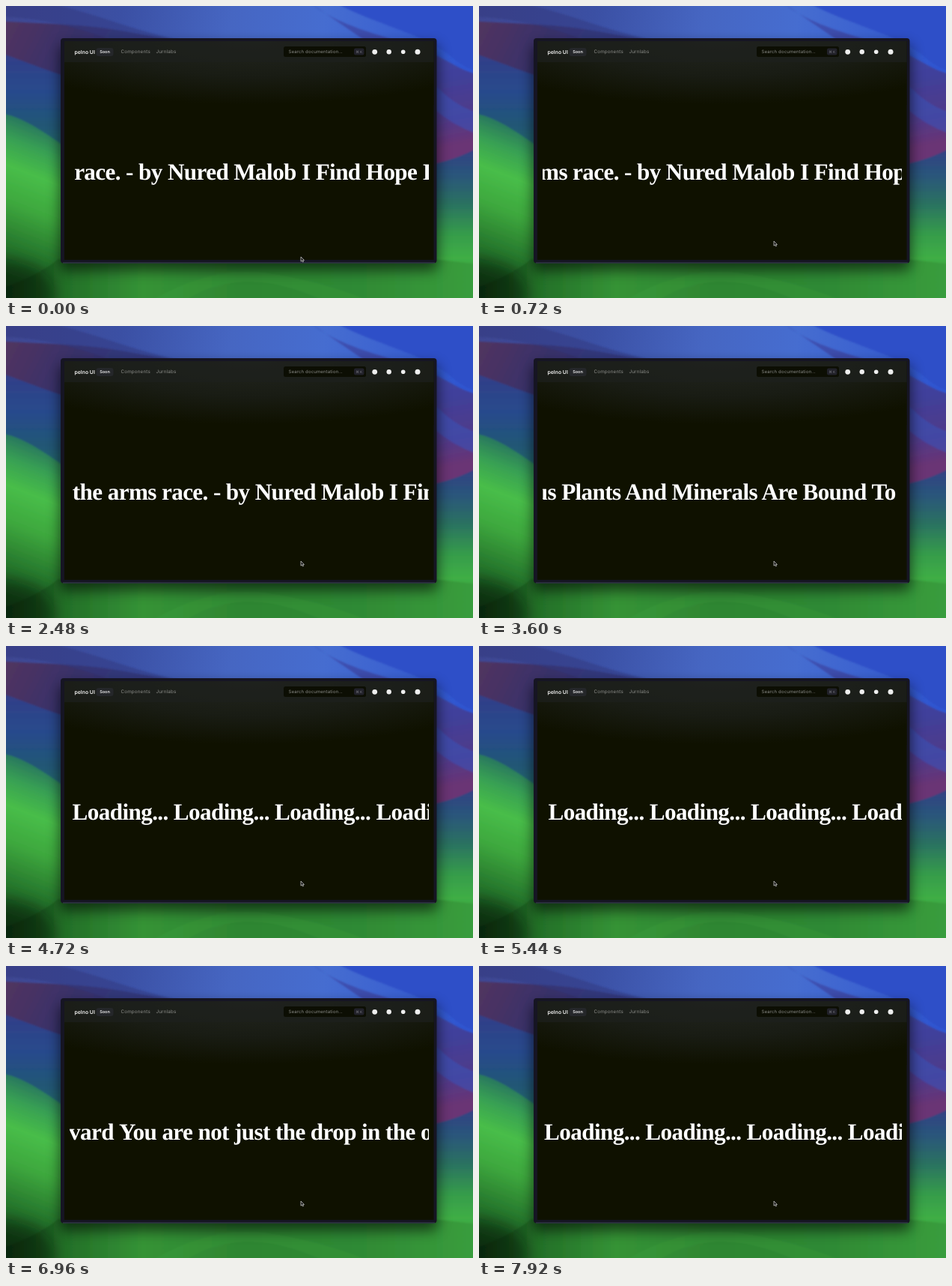
An HTML page that plays this animation: 624x390 px, repeating every 8 s.

```html
<!DOCTYPE html>
<html lang="en">
<head>
<meta charset="utf-8">
<title>Scrolling quotes</title>
<style>
  html, body { margin: 0; width: 100%; height: 100%; overflow: hidden; background: #234; }
  svg { display: block; width: 624px; height: 390px; }
  text { white-space: pre; text-rendering: geometricPrecision; font-family: Inter, sans-serif; }
  #line text {
    font: bold 31.2px "Liberation Serif", "Times New Roman", serif;
    letter-spacing: -.02em; fill: #fff;
  }
  .muted { font-size: 6.3px; letter-spacing: .14px; fill: #8b8c88; }
</style>
</head>
<body>
<svg viewBox="0 0 624 390">
  <defs>
    <linearGradient id="sky" x1="0" x2="1" y1="0" y2=".1">
      <stop offset="0" stop-color="#3f4791"/><stop offset=".25" stop-color="#3b50a4"/>
      <stop offset=".48" stop-color="#4666c2"/><stop offset=".68" stop-color="#466dd0"/>
      <stop offset="1" stop-color="#2f55d0"/>
    </linearGradient>
    <linearGradient id="plum" x1="0" x2="1" y1="0" y2=".2">
      <stop offset="0" stop-color="#54355f"/><stop offset=".35" stop-color="#38306a"/>
      <stop offset="1" stop-color="#2d4391"/>
    </linearGradient>
    <linearGradient id="sea" x1="0" x2="0" y1="0" y2="1">
      <stop offset="0" stop-color="#323e88"/><stop offset=".3" stop-color="#284a8c"/>
      <stop offset=".55" stop-color="#215775"/><stop offset="1" stop-color="#2c855c"/>
    </linearGradient>
    <linearGradient id="violet" x1="0" x2=".2" y1="0" y2="1">
      <stop offset="0" stop-color="#3d55b8"/><stop offset=".6" stop-color="#40409a"/>
      <stop offset=".85" stop-color="#513a88"/><stop offset="1" stop-color="#6a3474"/>
    </linearGradient>
    <linearGradient id="right" x1="0" x2="0" y1="0" y2="1">
      <stop offset="0" stop-color="#343f85"/><stop offset=".18" stop-color="#29567b"/>
      <stop offset=".35" stop-color="#2a7062"/><stop offset=".55" stop-color="#369c4b"/>
      <stop offset=".7" stop-color="#3fae45"/><stop offset="1" stop-color="#328f38"/>
    </linearGradient>
    <linearGradient id="left" x1=".15" x2="0" y1="0" y2="1">
      <stop offset="0" stop-color="#28745f"/><stop offset=".13" stop-color="#38a053"/>
      <stop offset=".27" stop-color="#48bd49"/><stop offset=".45" stop-color="#3ea83e"/>
      <stop offset=".7" stop-color="#23702a"/><stop offset="1" stop-color="#0b270f"/>
    </linearGradient>
    <linearGradient id="floor" x1="0" x2="1" y1="0" y2="0">
      <stop offset="0" stop-color="#0d2f11"/><stop offset=".13" stop-color="#226d27"/>
      <stop offset=".3" stop-color="#359336"/><stop offset=".5" stop-color="#2f8633"/>
      <stop offset=".75" stop-color="#2f8a34"/><stop offset="1" stop-color="#3a9e3d"/>
    </linearGradient>
    <radialGradient id="glow" gradientUnits="userSpaceOnUse" cx="0" cy="0" r="1"
      gradientTransform="translate(325 47) scale(360 84)">
      <stop offset="0" stop-color="#22251f"/><stop offset=".55" stop-color="#191c14"/>
      <stop offset="1" stop-color="#0f1100"/>
    </radialGradient>
    <filter id="soft" x="-10%" y="-10%" width="120%" height="120%"><feGaussianBlur stdDeviation="1"/></filter>
    <filter id="haze" x="-30%" y="-30%" width="160%" height="160%"><feGaussianBlur stdDeviation="9"/></filter>
    <clipPath id="lane"><path d="M85 190H565V255H85Z"/></clipPath>
  </defs>

  <!-- wallpaper -->
  <path fill="url(#sky)" d="M0 0H624V390H0Z"/>
  <g filter="url(#soft)">
    <path fill="url(#plum)" d="M-9 20C50 24 110 24 160 34S250 46 300 70V140H-9Z"/>
    <path fill="#323b80" d="M50 -5C110 6 160 30 230 45H140C90 26 40 16 -9 14V-5Z" opacity=".5"/>
    <path fill="url(#sea)" d="M-9 62C30 76 60 88 110 104V240H-9Z"/>
    <path fill="url(#violet)" d="M405 -5C440 24 490 36 540 52S600 85 633 92V215H500V60Z"/>
    <path fill="#2f50c8" d="M440 -5C490 25 560 35 600 72Q615 84 633 88V-5Z"/>
    <path fill="#3b50b6" d="M570 102Q600 135 633 143V172Q600 162 570 136Z" opacity=".6"/>
    <path fill="url(#right)" d="M540 216Q595 210 633 188V400H540Z"/>
    <path fill="url(#left)" d="M-9 143C20 147 45 164 90 196V400H-9Z"/>
    <path fill="url(#floor)" d="M70 338H570L633 345V400H-9V378Q40 362 70 338Z"/>
    <path fill="#47ab43" d="M185 400Q270 345 350 357T500 400H440Q370 366 320 368T230 400Z" opacity=".15"/>
  </g>
  <ellipse cx="0" cy="385" rx="65" ry="45" fill="#020a04" opacity=".4" filter="url(#haze)"/>
  <rect x="72" y="52" width="505" height="301" rx="6" fill="#000" opacity=".6" filter="url(#haze)"/>

  <!-- window -->
  <rect x="73" y="43" width="502.5" height="300.5" rx="4" fill="#161523"/>
  <path d="M76 343H573" stroke="#474d66" stroke-width=".8"/>
  <path fill="#0f1100" d="M78 47H571.5V339H78Z"/>
  <path fill="url(#glow)" d="M78 47H571.5V132H78Z"/>
  <path fill="#1d201d" d="M78 47H571.5V75H78Z" opacity=".7"/>

  <text x="91.5" y="63.6" font-size="6.9" font-weight="600" fill="#f2f2f2">pelno UI</text>
  <rect x="120.5" y="56" width="23" height="11" rx="3" fill="#25272a"/>
  <text x="132" y="63.3" font-size="5.5" font-weight="600" fill="#f0f0f0" text-anchor="middle">Soon</text>
  <text x="153.5" y="63.4" class="muted">Components</text>
  <text x="200.5" y="63.4" class="muted">Jurnlabs</text>
  <rect x="371" y="54" width="110" height="14" rx="2.5" fill="#0c0e03"/>
  <text x="377.5" y="63.3" class="muted" style="font-size:6px">Search documentation...</text>
  <rect x="465" y="56.5" width="13.5" height="9" rx="2" fill="#212129"/>
  <text x="471.7" y="62.8" font-size="4.6" fill="#74747c" text-anchor="middle">⌘ K</text>
  <g fill="#eee">
    <circle cx="492.7" cy="61.3" r="3.4"/><circle cx="511.7" cy="61.3" r="3.2"/>
    <circle cx="530.7" cy="61.3" r="2.8"/><circle cx="550" cy="61.3" r="3.5"/>
  </g>

  <g id="line" clip-path="url(#lane)">
    <text id="tail" y="232" text-anchor="end"></text>
    <text id="head" y="232"></text>
  </g>
  <path id="cursor" d="M0 0V6.2L1.5 4.9L2.5 7L3.5 6.5L2.6 4.5H4.4Z" fill="#111" stroke="#ddd" stroke-width=".7"/>
</svg>
<script>
const LOOP = 8000, STEP = 80, LEFT = 84.5;
const el = id => document.getElementById(id);
const tail = el("tail"), head = el("head"), cursor = el("cursor");
const load = "Loading... ";

// Each line enters at x and drifts right at speed px/ms; the end of its previous copy leads it.
const scene = (start, x, speed, last, first) => ({ start, x, speed, last, first });
const loading = start => scene(start, LEFT, .0054, load, load.repeat(4));
const scenes = [
  scene(0, 395, .0471, "of the arms race. - by Nured Malob ", "I Find Hope In "),
  loading(2560),
  scene(3040, LEFT, .0458, "- by Petor Malius ", "Plants And Minerals Are Bound To Change"),
  loading(3960),
  scene(5480, LEFT, .045, "- by Edvin Tolvard ", "You are not just the drop in the ocean. You"),
  loading(7440)
];

let shown;
function draw(now) {
  const t = Math.floor(now % LOOP / STEP) * STEP;
  const s = scenes.findLast(s => t >= s.start);
  if (s !== shown) {
    tail.textContent = s.last;
    head.textContent = s.first;
    shown = s;
  }
  const x = s.x + (t - s.start) * s.speed;
  tail.setAttribute("x", x);
  head.setAttribute("x", x);

  const rest = (1 - Math.min(t / 560, 1)) ** 2;
  cursor.setAttribute("transform", `translate(394 ${314 + 21 * rest})`);
}
const begin = performance.now();
function tick() {
  draw(performance.now() - begin);
  requestAnimationFrame(tick);
}
tick();
</script>
</body>
</html>
```
